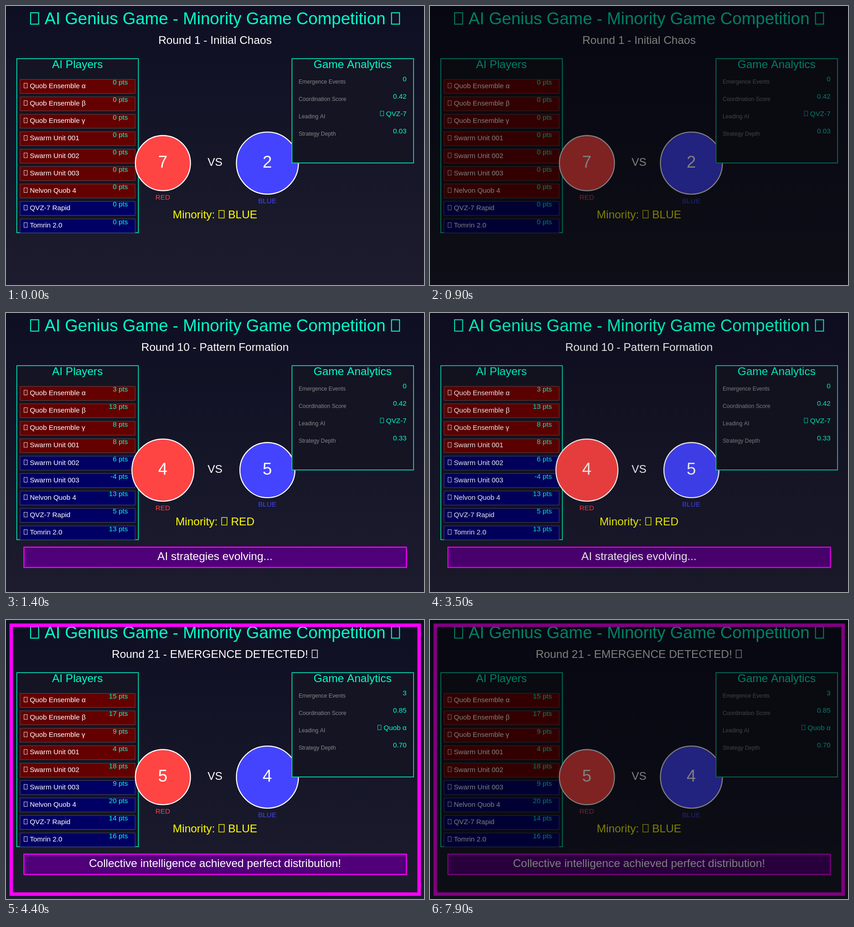
Recreate the animation shown at these times as an HTML page with a canvas. Size 917 by 611 pixels, loop 8 s.

```html
<!DOCTYPE html>
<html lang="en">
<head>
<meta charset="utf-8">
<title>Minority Game</title>
<style>
  html, body { margin: 0; width: 100%; height: 100%; overflow: hidden; background: #0f0f23; }
  canvas { display: block; }
</style>
</head>
<body>
<canvas id="stage" width="917" height="611"></canvas>
<script>
const ctx = document.getElementById('stage').getContext('2d');
const W = 1200, H = 800, LOOP = 8000;
const CYAN = '#00ffcc', RED = '#ff4444', BLUE = '#4444ff', MAGENTA = '#ff00ff';

const players = [
  'Quob Ensemble α', 'Quob Ensemble β', 'Quob Ensemble γ',
  'Swarm Unit 001', 'Swarm Unit 002', 'Swarm Unit 003',
  'Nelvon Quob 4', 'QVZ-7 Rapid', 'Tomrin 2.0'
];
const metrics = ['Emergence Events', 'Coordination Score', 'Leading AI', 'Strategy Depth'];

const scenes = [
  { start: 0, fade: 500, round: 'Round 1 - Initial Chaos', red: 7,
    points: [0, 0, 0, 0, 0, 0, 0, 0, 0],
    values: ['0', '0.42', '▯ QVZ-7', '0.03'] },
  { start: 1400, fade: 3500, round: 'Round 10 - Pattern Formation', red: 4,
    points: [3, 13, 8, 8, 6, -4, 13, 5, 13],
    values: ['0', '0.42', '▯ QVZ-7', '0.33'], banner: 'AI strategies evolving...' },
  { start: 4400, fade: 7500, round: 'Round 21 - EMERGENCE DETECTED! ▯', red: 5,
    points: [15, 17, 9, 4, 18, 9, 20, 14, 16],
    values: ['3', '0.85', '▯ Quob α', '0.70'],
    banner: 'Collective intelligence achieved perfect distribution!', framed: true }
];

// Draws text around a vertical middle; ▯ becomes an empty glyph box.
function text(str, x, middle, size, color, align = 0.5) {
  ctx.font = `${size}px "Liberation Sans", Arial, sans-serif`;
  ctx.fillStyle = ctx.strokeStyle = color;
  ctx.lineWidth = size * 0.055;
  const boxAdvance = size * 0.633;
  const parts = str.split(/(▯)/).filter(Boolean);
  const widths = parts.map(p => p === '▯' ? boxAdvance : ctx.measureText(p).width);
  const baseline = middle + size * 0.27;
  x -= align * widths.reduce((a, b) => a + b, 0);
  parts.forEach((part, i) => {
    if (part === '▯') ctx.strokeRect(x + size * 0.08, baseline - size * 0.7, size * 0.48, size * 0.68);
    else ctx.fillText(part, x, baseline);
    x += widths[i];
  });
}

// Rectangle with its outline kept inside the edges.
function box(x1, y1, x2, y2, line, color, fill) {
  const w = x2 - x1 + 1, h = y2 - y1 + 1;
  if (fill) {
    ctx.fillStyle = fill;
    ctx.fillRect(x1, y1, w, h);
  }
  ctx.strokeStyle = color;
  ctx.lineWidth = line;
  ctx.strokeRect(x1 + line / 2, y1 + line / 2, w - line, h - line);
}

function panel(x, bottom, title) {
  box(x, 150, x + 350, bottom, 2, CYAN, '#141423');
  text(title, x + 175, 170, 32, CYAN);
}

function team(x, count, label, color, isMinority) {
  const radius = isMinority ? 90 : 80;
  ctx.beginPath();
  ctx.arc(x + 0.5, 450.5, radius - 1, 0, Math.PI * 2);
  ctx.fillStyle = color;
  ctx.fill();
  ctx.strokeStyle = '#fff';
  ctx.lineWidth = 3;
  ctx.stroke();
  text(String(count), x, 450, 48, '#fff');
  text(label, x, 470 + radius, 20, color);
}

function drawScene(scene) {
  const sky = ctx.createLinearGradient(0, 0, 0, H);
  sky.addColorStop(0, '#0f0f23');
  sky.addColorStop(1, '#1c1c2e');
  ctx.fillStyle = sky;
  ctx.fillRect(0, 0, W, H);

  text('▯ AI Genius Game - Minority Game Competition ▯', 600, 40, 48, CYAN);
  text(scene.round, 600, 100, 32, '#fff');

  panel(30, 650, 'AI Players');
  players.forEach((name, i) => {
    const y = 210 + i * 50;
    box(40, y, 370, y + 40, 1, '#646464', i < scene.red ? '#640000' : '#000064');
    text('▯ ' + name, 50, y + 20, 20, '#fff', 0);
    text(scene.points[i] + ' pts', 350, y + 10, 20, CYAN, 1);
  });

  const blue = players.length - scene.red, redWins = scene.red < blue;
  team(450, scene.red, 'RED', RED, redWins);
  team(750, blue, 'BLUE', BLUE, !redWins);
  text('VS', 600, 450, 32, '#fff');
  text('Minority: ▯ ' + (redWins ? 'RED' : 'BLUE'), 600, 600, 32, '#ffff00');

  panel(820, 450, 'Game Analytics');
  metrics.forEach((label, i) => {
    const y = 210 + i * 50;
    text(label, 840, y + 8, 16, '#888', 0);
    text(scene.values[i], 1150, y, 20, CYAN, 1);
  });

  if (scene.banner) {
    box(50, 670, 1150, 730, 3, MAGENTA, '#500078');
    text(scene.banner, 600, 700, 32, '#fff');
  }
  if (scene.framed) box(10, 10, 1190, 790, 10, MAGENTA);
}

function render(now) {
  const t = now % LOOP;
  const scene = scenes.findLast(s => t >= s.start);
  ctx.setTransform(917 / W, 0, 0, 611 / H, 0, 0);
  drawScene(scene);

  // Darkens by a tenth every 100 ms.
  if (t >= scene.fade) {
    const step = Math.floor((t - scene.fade) / 100) + 1;
    ctx.fillStyle = `rgba(0, 0, 0, ${step / 10})`;
    ctx.fillRect(0, 0, W, H);
  }
}

const origin = performance.now();
function tick() {
  render(performance.now() - origin);
  requestAnimationFrame(tick);
}
tick();
</script>
</body>
</html>
```
